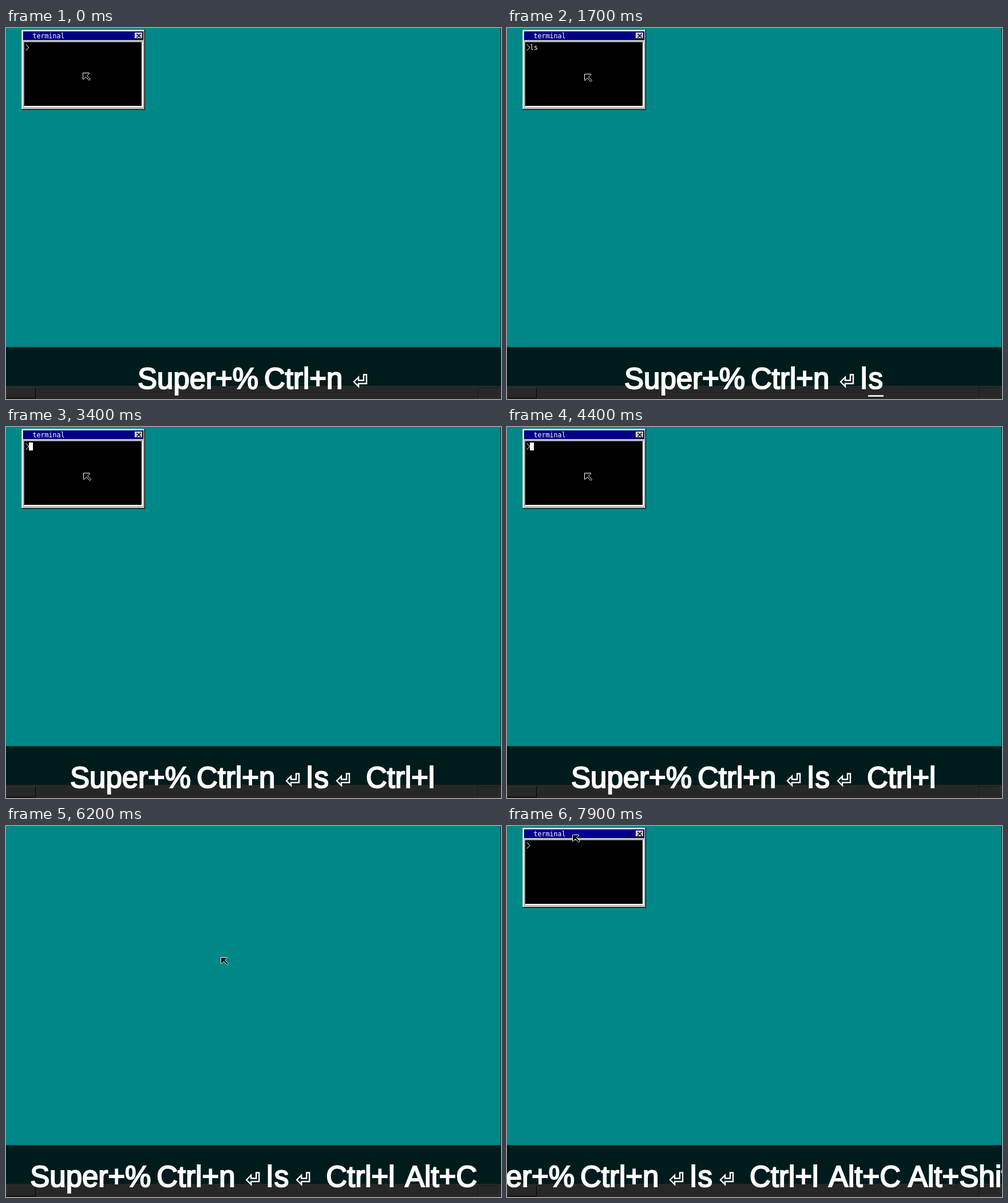
An HTML page that plays this animation: 865x648 px, repeating every 8000 ms.

```html
<!DOCTYPE html>
<html lang="en">
<head>
<meta charset="utf-8">
<title>Terminal key presses</title>
<style>
  html, body { margin: 0; width: 100%; height: 100%; overflow: hidden; background: #008787; }
  svg { display: block; width: 865px; height: 648px; }
  .mono { font: 11.65px "DejaVu Sans Mono", monospace; fill: #fff; white-space: pre; }
  .key { font: 51px "Liberation Sans", Arial, sans-serif; fill: #fff; stroke: #fff; stroke-width: 2.1; }
  .line { fill: none; stroke: #fff; }
</style>
</head>
<body>
<svg viewBox="0 0 865 648">
  <defs>
    <path id="prompt" class="line" d="M34.5 28.5L39.8 34L34.5 39.5"/>
    <path id="enter" class="line" stroke-width="2.4" d="M1 14L9 6V11.5H18V1.5H23V17H9V22Z"/>
  </defs>
  <rect width="865" height="648" fill="#008787"/>
  <rect x="864" width="1" height="557" fill="#002828"/>

  <g id="terminal">
    <rect x="27" y="3" width="216" height="140" fill="#000"/>
    <rect x="27" y="3" width="215" height="139" fill="#c0c0c0"/>
    <path class="line" d="M28.5 141V4.5H241"/>
    <path fill="none" stroke="#808080" d="M28 141.5H241.5V4"/>
    <rect x="30" y="6" width="210" height="15" fill="#000087"/>
    <text class="mono" x="46.5" y="18">terminal</text>
    <rect x="225" y="8" width="14" height="11" fill="#c0c0c0"/>
    <path class="line" d="M225.5 19V8.5H239"/>
    <path fill="none" stroke="#000" d="M225 18.5H238.5V8"/>
    <path fill="none" stroke="#000" stroke-width="1.4" d="M228.5 10L235.5 17M235.5 10L228.5 17"/>
    <rect x="31" y="24" width="208" height="114" fill="#fff"/>
    <path fill="none" stroke="#808080" d="M31.5 137V24.5H238"/>
    <rect x="32" y="25" width="205" height="111" fill="#000"/>
    <use href="#prompt"/>
    <use href="#prompt" id="prompt2" y="14"/>
    <text class="mono" id="typed" x="40" y="38"></text>
    <rect id="block" x="40" y="27" width="7" height="14" fill="#fff"/>
  </g>

  <path id="mouse" fill="#000" stroke="#fff" d="M.5 .5H11.5V1.5L7.5 5.5L13.5 11.5L11.5 13.5L5.5 7.5L1.5 11.5H.5Z"/>

  <rect y="557" width="865" height="91" fill="#001b1b"/>
  <rect y="556" width="865" height="1" fill="#007c7c"/>
  <rect y="557" width="865" height="1" fill="#005050"/>
  <rect y="626" width="865" height="22" fill="#272727"/>
  <rect y="625" width="865" height="1" fill="#2a2a2a"/>
  <path fill="none" stroke="#333" d="M1.5 646V628.5H51M825 646.5H861.5V628"/>
  <path fill="none" stroke="#000" d="M1 646.5H51.5V628"/>
  <path fill="none" stroke="#1a1a1a" d="M824.5 646V628.5H861"/>
  <g id="keys"></g>
</svg>
<script>
const LOOP = 8000, WIDTH = 865;
const el = id => document.getElementById(id);
const within = (t, from, to) => t >= from && t < to;

// x: glyph origin; from..to: underline span; all relative to the start of the line
const keys = [
  { text: "Super+%", x: -2, from: 0, to: 205, at: -1000 },
  { text: "Ctrl+n", x: 219, from: 219, to: 358, at: -1000 },
  { x: 375, from: 375, to: 401, at: -1000 },
  { text: "l", x: 411, from: 413, to: 424, at: 1500 },
  { text: "s", x: 424.5, from: 424, to: 451, at: 1600 },
  { x: 463, from: 463, to: 489, at: 1800 },
  { text: "Ctrl+l", x: 515, from: 514, to: 637, at: 2500 },
  { text: "Alt+C", x: 653, from: 653.5, to: 776.5, at: 4900 },
  { text: "Alt+Shift+C", x: 792, from: 792, to: 1047, at: 6800 }
];

function add(parent, tag, attrs) {
  const node = document.createElementNS("http://www.w3.org/2000/svg", tag);
  for (const name in attrs) node.setAttribute(name, attrs[name]);
  return parent.appendChild(node);
}

for (const key of keys) {
  key.group = add(el("keys"), "g", {});
  if (key.text) {
    add(key.group, "text", { class: "key", x: key.x, y: 630 }).textContent = key.text;
  } else {
    add(key.group, "use", { href: "#enter", x: key.x, y: 604 });
  }
  key.underline = add(key.group, "rect", {
    x: key.from, y: key.text ? 641.3 : 639.3, width: key.to - key.from, height: 2.6, fill: "#fff"
  });
}

const blinks = [[400, 900], [1400, 1500], [2400, 2500], [3400, 3900], [4400, 4900], [7300, 7800]];
const show = (node, on) => node.setAttribute("visibility", on ? "inherit" : "hidden");
const smooth = u => u * u * (3 - 2 * u);
const progress = (t, start) => smooth(Math.min(1, Math.max(0, (t - start + 100) / 700)));
const bezier = (u, a, b, c, d) => {
  const v = 1 - u;
  return v * v * v * a + 3 * v * v * u * b + 3 * v * u * u * c + u * u * u * d;
};

function mousePosition(t) {
  if (t < 600) return [134, 78];
  if (t < 7300) {
    const u = progress(t, 5600);
    return [135 + 240 * u, 80 + 149 * u];
  }
  const u = progress(t, 7300);
  return [bezier(u, 375, 255, 130, 114), Math.max(0, bezier(u, 229, 110, -50, 15))];
}

function draw(t) {
  show(el("terminal"), !within(t, 4900, 6800));
  show(el("prompt2"), within(t, 1800, 2500));
  el("typed").textContent = within(t, 1500, 2500) ? (t < 1600 ? "l" : "ls") : "";
  show(el("block"), blinks.some(([on, off]) => within(t, on, off)));
  el("block").setAttribute("y", within(t, 1800, 2500) ? 41 : 27);
  el("mouse").setAttribute("transform", `translate(${mousePosition(t).map(Math.round)})`);

  let end = 0;
  for (const key of keys) {
    show(key.group, t >= key.at);
    show(key.underline, within(t, key.at, key.at + 200));
    if (t >= key.at) end = key.to;
  }
  el("keys").setAttribute("transform", `translate(${(WIDTH - end) / 2})`);
}

const start = performance.now();
function tick() {
  const t = (performance.now() - start) % LOOP;
  draw(Math.floor(t / 100) * 100);
  requestAnimationFrame(tick);
}
tick();
</script>
</body>
</html>
```
